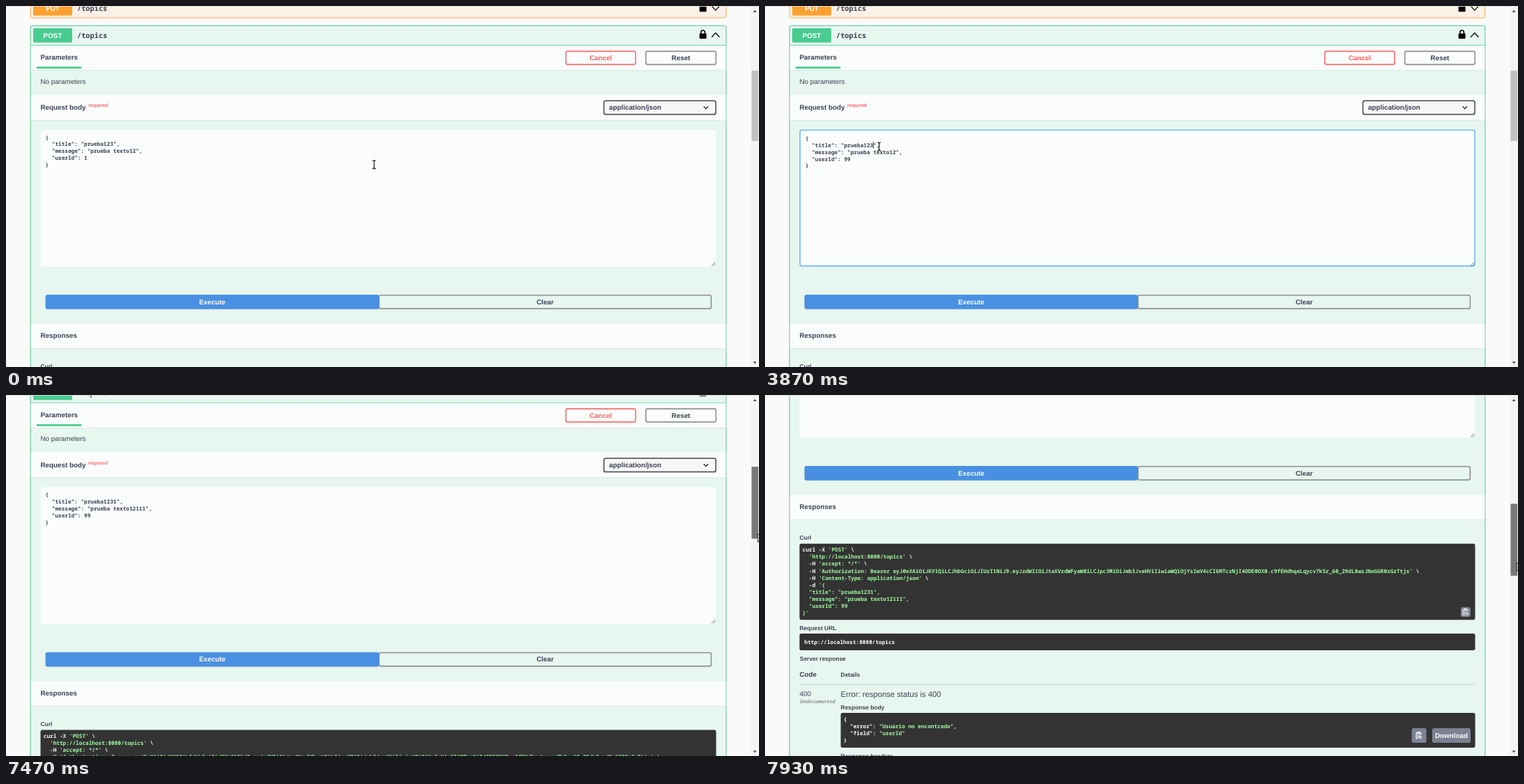
An HTML page that plays this animation: 1080 by 519 pixels, repeating every 8 s.

```html
<!DOCTYPE html>
<html lang="es">
<head>
<meta charset="utf-8">
<title>POST /topics</title>
<style>
html, body { margin: 0; width: 100%; height: 100%; overflow: hidden; background: #fafafa; }
svg { display: block; width: 1080px; height: 519px; text-rendering: geometricPrecision; }
text { font: 9.84px "Liberation Sans", Arial, sans-serif; fill: #3b4151; white-space: pre; }
.b { font-weight: 700; }
.s { font-weight: 700; font-size: 8.44px; }
.m { font: 700 7.732px "Noto Sans Mono", monospace; }
.mid { text-anchor: middle; }
</style>
</head>
<body>
<svg id="stage" viewBox="0 0 1080 519"></svg>
<script>
const LOOP = 8000, STEP = 1000 / 15;
const GREEN = '#49cc90', INK = '#3b4151', PALE = '#fafdfc', DARK = '#333', LIME = '#a2fca2';

const rect = (x, y, w, h, fill, more = '') =>
  `<rect x="${x}" y="${y}" width="${w}" height="${h}" fill="${fill}" ${more}/>`;
const text = (x, y, str, cls = 'b', more = '') =>
  `<text x="${x}" y="${y}" class="${cls}" ${more}>${str}</text>`;
const path = (d, stroke, width, more = '') =>
  `<path d="${d}" fill="none" stroke="${stroke}" stroke-width="${width}" ${more}/>`;
const line = (y, color, x1 = 35.7, x2 = 1032.5) => path(`M${x1} ${y}H${x2}`, color, 0.8);

// White code with green stretches between tildes
const code = (x, y, str) => text(x, y, str.split('~').map((part, i) =>
  i % 2 ? `<tspan fill="${LIME}">${part}</tspan>` : part).join(''), 'm', 'style="fill:#fff"');
const codeLines = (x, y, list) => list.map((str, i) => code(x, y + i * 10.12, str)).join('');

const section = (y, h) => rect(35.8, y, 996.6, h, PALE) + line(y + h + 0.3, '#d5e4de');

const opHead = (y, name, color, open) =>
  rect(39, y + 4, 56, 20.4, color, 'rx="2"') +
  text(67, y + 17.7, name, 'b mid', 'style="fill:#fff"') +
  text(102, y + 18, '/topics', 'm', 'style="font-size:10.31px"') +
  rect(994.6, y + 11.5, 10, 7.5, '#000', 'rx="1"') +
  path(`M996.8 ${y + 12}V${y + 9.8}a2.8 2.8 0 0 1 5.6 0V${y + 12}`, '#000', 1.6) +
  path(open ? `M1012.2 ${y + 16.8}l5.6 -6l5.6 6` : `M1012.2 ${y + 10.8}l5.6 6l5.6 -6`, '#000', 1.3);

const button = (x, y, w, h, stroke, label, color = INK, fill = 'none') =>
  rect(x, y + 1, w, h, 'none', 'rx="2.5" stroke="#000" stroke-opacity=".07" stroke-width="1.6"') +
  rect(x, y, w, h, fill, `rx="2.5" stroke="${stroke}" stroke-width="1.4"`) +
  text(x + w / 2, y + h / 2 + 3.4, label, 'b mid', `style="fill:${color}"`);

const clipIcon = (x, y, size) => {
  const k = size / 14;
  return `<g transform="translate(${x} ${y})">` +
    rect(0, 0, size, size, '#7d8293', 'rx="2"') +
    `<g transform="translate(${size / 2 - 7} ${size / 2 - 7})">` +
    path('M6.5 11.3H3V3.4H10V6M4.8 3.4V2.3H8.2V3.4M4.4 5.5H8.6M4.4 7.3H6M4.4 9.1H6M11.5 8.8H7M8.6 7L6.8 8.8L8.6 10.6M8.6 11.3H10V10',
      '#fff', k > 1.2 ? 1.1 : 1) + '</g></g>';
};

const token = 'eyJ0eXAiOiJKV1QiLCJhbGciOiJIUzI1NiJ9.' +
  'eyJzdWIiOiJtaXVzdWFyaW8iLCJpc3MiOiJmb3JvaHViIiwiaWQiOjYsImV4cCI6MTczNjI4ODE0OX0.' +
  'c9fEHdhqeLqycv7kSr_60_29dL8wzJNoGGR0zGzTtjs';

const curl = [
  "curl -X ~'POST'~ \\",
  "  ~'http://localhost:8080/topics'~ \\",
  "  -H ~'accept: */*'~ \\",
  `  -H ~'Authorization: Bearer ${token}'~ \\`,
  "  -H ~'Content-Type: application/json'~ \\",
  "  -d ~'{~",
  '~  "title": "prueba1231",~',
  '~  "message": "prueba texto12111",~',
  '~  "userId": 99~',
  "~}'~"
];

const putBlock =
  rect(35.3, -30, 997.5, 47, '#fbf1e6', 'rx="2.5" stroke="#fca130" stroke-width=".9"') +
  opHead(-10.7, 'PUT', '#fca130', false);

const postBlock =
  rect(35.3, 28.4, 997.5, 1400, 'none', 'rx="2.5" stroke="#000" stroke-opacity=".06" stroke-width="3"') +
  rect(35.3, 28.4, 997.5, 1400, '#e8f6f0', `rx="2.5" stroke="${GREEN}" stroke-width=".9"`) +
  opHead(28, 'POST', GREEN, true) + line(56.4, GREEN) +
  section(57, 35.3) + text(49.5, 77.2, 'Parameters') + rect(44, 87.2, 64.3, 2.8, GREEN) +
  button(803, 65, 100, 19, '#ff6060', 'Cancel', '#ff6060') +
  button(917.7, 65, 100.6, 19, '#888', 'Reset') +
  text(49.5, 111.5, 'No parameters', '') +
  section(128, 36) + text(49.5, 149.3, 'Request body') +
  text(118, 145, 'required', 'b', 'style="font-size:7.03px;fill:#ff0000;fill-opacity:.6"') +
  rect(857.6, 137, 160.4, 19.4, 'none', 'rx="2.5" stroke="#000" stroke-opacity=".2" stroke-width="2"') +
  rect(857.6, 136.2, 160.4, 19.4, '#f7f7f7', 'rx="2.5" stroke="#41444e" stroke-width="1.4"') +
  text(865, 149.3, 'application/json') + path('M1000.6 144.4l3.2 3.2l3.2 -3.2', '#111', 1.3) +
  rect(49.6, 178, 969, 196.5, PALE, 'rx="2.5" id="area"') +
  '<g id="body">' + [0, 1, 2, 3, 4].map(i => text(56.5, 191.6 + i * 9.84, '', 'm')).join('') + '</g>' +
  '<path id="caret" stroke="#222" stroke-width=".8"/>' +
  path('M1012 373.6l5.4 -5.4M1015 373.6l2.4 -2.4', '#444', 0.8) +
  rect(56.5, 415, 478.5, 21, 'none', 'id="glow" rx="3" stroke="#000" stroke-opacity=".14" stroke-width="4"') +
  button(535, 415.6, 476.4, 19.4, '#888', 'Clear') +
  button(57.3, 415.6, 477, 19.4, '#4990e2', 'Execute', '#fff', '#4990e2');

const responses =
  section(457, 35.2) + text(49.5, 477.3, 'Responses') +
  text(49.5, 521, 'Curl', 's') +
  rect(49.5, 526.8, 969, 109.4, DARK, 'rx="2.8"') + codeLines(53.8, 538.2, curl) +
  clipIcon(998, 618, 14) +
  text(49.5, 650.8, 'Request URL', 's') +
  rect(49.5, 656, 969, 24, DARK, 'rx="2.8"') + code(56.5, 671, 'http://localhost:8080/topics') +
  text(49.8, 695.4, 'Server response', 's') +
  text(49.5, 717.6, 'Code') + text(108.6, 717.7, 'Details', 's') +
  line(729.4, '#b9cfc8', 49.5, 1018.5) +
  text(49.5, 746, '400', '') +
  text(49.5, 756.2, 'Undocumented', 'm', 'style="font-size:7.09px;font-style:italic;fill:#909090"') +
  text(108.6, 747, 'Error: response status is 400', '', 'style="font-size:11.25px"') +
  text(108.6, 764.6, 'Response body', 's') +
  rect(108.6, 770, 910, 50, DARK, 'rx="2.8"') +
  codeLines(112.8, 782, ['{', '  "error": ~"Usuario no encontrado"~,', '  "field": ~"userId"~', '}']) +
  clipIcon(927.6, 792, 21) + rect(957, 792, 55, 21, '#7d8293', 'rx="2.8"') +
  text(984.5, 806, 'Download', 'b mid', 'style="fill:#fff"') +
  text(108.6, 835, 'Response headers', 's');

const spinner =
  '<g id="load" transform="translate(534 485.1)">' +
  '<circle r="20.4" fill="none" stroke="#555" stroke-opacity=".1" stroke-width="1.4"/>' +
  path('M-14.4 -14.4A20.4 20.4 0 0 1 14.4 -14.4', '#000', 1.4, 'id="arc" stroke-opacity=".6"') +
  text(0, 2.5, 'LOADING', 'b mid', 'style="font-size:7.03px"') + '</g>';

const bar =
  rect(1068.3, 0, 12, 519, '#f4f4f4') + rect(1069.4, 0, 9.6, 10, '#c1c1c1', 'id="thumb"') +
  '<path d="M1071.6 9h5l-2.5 -3.2zM1071.6 511.3h5l-2.5 3.2z" fill="#505050"/>';

const pointers =
  '<g id="beam">' + path('M-2.6 -6Q0 -6 0 -4.6Q0 -6 2.6 -6M0 -5V5M-2.6 6Q0 6 0 4.6Q0 6 2.6 6', '#fff', 2.2, 'stroke-opacity=".6"') +
  path('M-2.6 -6Q0 -6 0 -4.6Q0 -6 2.6 -6M0 -5V5M-2.6 6Q0 6 0 4.6Q0 6 2.6 6', '#111', 1.2) + '</g>' +
  '<path id="arrow" d="M0 0V12L2.8 9.5L4.6 13.6L6.4 12.8L4.7 8.8H8.5Z" fill="#fff" stroke="#000" stroke-width=".8"/>' +
  '<path id="hand" d="M-2.2 -5.6q1.2 -1.4 2.4 0V-1q1.2 -1 2.3 .3q1.2 -.7 2.1 .5q1.6 -.4 1.6 1.2V4.6L5 7.6V9.6H-1.2V8L-5 2.6q.4 -1.8 2.8 0Z" ' +
  'fill="#fff" stroke="#000" stroke-width=".9" stroke-linejoin="round"/>';

const $ = id => document.getElementById(id);
$('stage').innerHTML = rect(0, 0, 1080, 519, '#fafafa') +
  `<g id="page">${putBlock}${postBlock}<g id="resp">${responses}</g>${spinner}</g>` +
  bar + rect(0, 0, 1080, 0.9, '#e4e4e4') + pointers;

// Pointer: ms, x, y
const mouse = [
  [0, 528, 228], [667, 127, 221], [934, 127, 221], [1130, 128, 219], [3000, 128, 219],
  [3134, 133, 218], [3200, 133, 218], [3600, 160, 202], [3800, 160, 202], [3867, 163.7, 202],
  [4130, 163.7, 202], [4400, 190, 209], [5200, 190, 209], [5467, 327, 208], [5600, 327, 208],
  [6330, 391, 428], [6533, 391, 428], [7260, 1075, 189], [7333, 1078.4, 190],
  [7600, 1078.4, 209], [7733, 1078.4, 222], [7933, 1078.4, 241], [8000, 1078.4, 241]
];
const scroll = [[0, 0], [7333, 0], [7400, 12], [7467, 45], [7600, 124], [7733, 220], [7800, 256], [7933, 313], [8000, 313]];

// Edits: ms, caret line, caret column, title, message, id
const edits = [
  [0, 3, 13, '123', '12', '1'],
  [733, 3, 13, '123', '12', '1'],
  [2066, 3, 12, '123', '12', ''],
  [2333, 3, 13, '123', '12', '9'],
  [2533, 3, 14, '123', '12', '99'],
  [3666, 1, 21, '123', '12', '99'],
  [4133, 1, 22, '1231', '12', '99'],
  [4600, 2, 28, '1231', '12', '99'],
  [5000, 2, 29, '1231', '121', '99'],
  [5133, 2, 30, '1231', '1211', '99'],
  [5266, 2, 31, '1231', '12111', '99']
];
const FOCUS = 733, BLUR = 6400, LOAD = 6466, DONE = 6533, BLINK = 530;

const smooth = u => u * u * (3 - 2 * u);
function at(keys, t, ease = u => u) {
  let i = 0;
  while (i < keys.length - 2 && t >= keys[i + 1][0]) i++;
  const a = keys[i], b = keys[i + 1];
  const u = ease(Math.min(1, (t - a[0]) / (b[0] - a[0])));
  return a.slice(1).map((v, n) => v + (b[n + 1] - v) * u);
}
const set = (id, attrs) => { for (const k in attrs) $(id).setAttribute(k, attrs[k]); };
const show = (id, on) => set(id, { visibility: on ? 'visible' : 'hidden' });

function draw(ms) {
  const t = Math.floor((ms + 5) / STEP) * STEP + 0.7;
  const [x, y] = at(mouse, t, t < 7330 ? smooth : undefined);
  const [top] = at(scroll, t);
  const focus = t >= FOCUS && t < BLUR;
  const loading = t >= LOAD && t < DONE;

  const [since, row, col, title, msg, id] = edits.filter(e => e[0] <= t).pop();
  const shift = focus ? 1.4 : 0;
  ['{', `  "title": "prueba${title}",`, `  "message": "prueba texto${msg}",`, `  "userId": ${id}`, '}']
    .forEach((str, i) => { $('body').children[i].textContent = str; });
  set('body', { transform: `translate(${shift} ${shift})` });
  set('area', focus
    ? { x: 50.2, y: 178.4, width: 967.8, height: 195.4, stroke: '#61affe', 'stroke-width': 1.4 }
    : { x: 49.6, y: 178, width: 969, height: 196.5, stroke: 'none' });
  const cx = 57.9 + col * 4.639, cy = 184.9 + row * 9.84;
  set('caret', { d: `M${cx} ${cy}v10.2` });
  show('caret', focus && Math.floor((t - since) / BLINK) % 2 === 0);

  set('page', { transform: `translate(0 ${-top})` });
  set('resp', { transform: `translate(0 ${loading ? 70.3 : 0})` });
  set('load', { opacity: Math.min(1, (t - LOAD + 20) / 500) });
  set('arc', { transform: `rotate(${(t - LOAD) * 0.36})` });
  show('load', loading);

  const [ty, th] = loading ? [90.6, 98.5] : t < DONE ? [93, 101] : [94.1 + top * 0.199, 103.4];
  const held = t >= 7330, near = x > 1068;
  set('thumb', { y: ty, height: th, fill: held ? '#787878' : near ? '#a8a8a8' : '#c1c1c1' });

  const inBar = y > 415 && y < 436 && x < 1012;
  const kind = held || near ? 'arrow' : inBar ? 'hand' : y > 178 && y < 374 && x < 1018 ? 'beam' : 'arrow';
  for (const name of ['beam', 'arrow', 'hand']) show(name, name === kind);
  set(kind, { transform: `translate(${x} ${y})` });
  show('glow', inBar && x < 535);
}

const start = performance.now();
function tick() {
  draw((performance.now() - start) % LOOP);
  requestAnimationFrame(tick);
}
tick();
</script>
</body>
</html>
```
